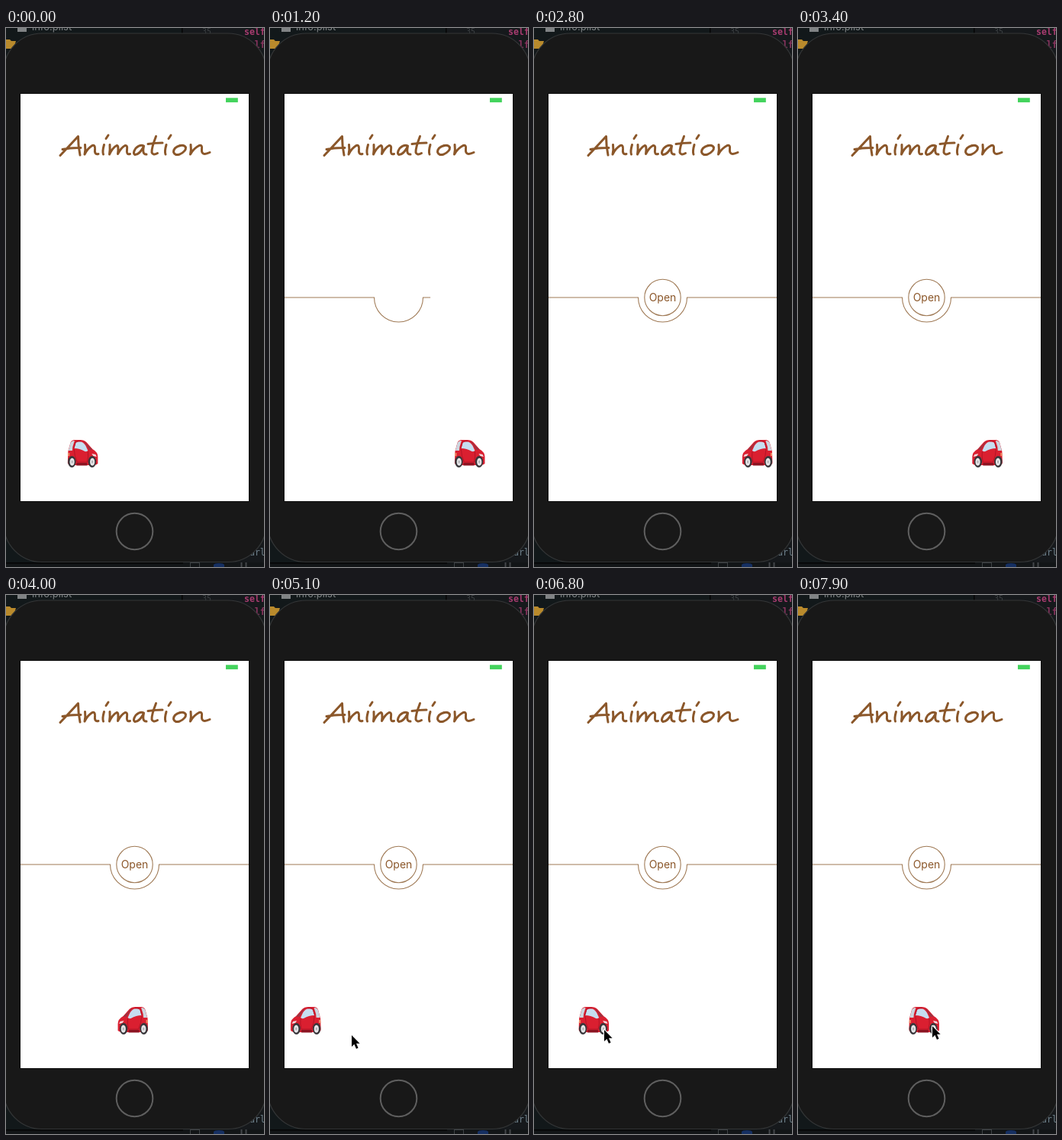
Animation, 338 px wide and 704 px high, one loop 8000 ms. Source, as an HTML page with a canvas:

```html
<!DOCTYPE html>
<html lang="en">
<head>
<meta charset="utf-8">
<title>Animation</title>
<style>
html, body { margin: 0; width: 100%; height: 100%; overflow: hidden; background: #12181a; }
canvas { display: block; width: 338px; height: 704px; }
</style>
</head>
<body>
<canvas id="stage" width="338" height="704" role="img" aria-label="Animation"></canvas>
<script>
const ctx = document.getElementById('stage').getContext('2d');
const LOOP = 8000, STEP = 100;
const BROWN = '#8b572a', THIN = '#a07b57';
const MID = 168.5, LINE_Y = 352, BOWL = 32;
const LEFT = 38.5, RIGHT = 298.5, CAR_Y = 556;
const MOVE = 3000, TURN = 500, HALT = 7463;

const clamp = v => Math.max(0, Math.min(1, v));
const mix = (a, b, p) => a + (b - a) * p;

// cubic-bezier(.42, 0, .58, 1)
function ease(p) {
  p = clamp(p);
  let lo = 0, hi = 1;
  for (let i = 0; i < 24; i++) {
    const s = (lo + hi) / 2, r = 1 - s;
    const x = 1.26 * s * r * r + 1.74 * s * s * r + s * s * s;
    if (x < p) lo = s; else hi = s;
  }
  return lo * lo * (3 - 2 * lo);
}
const phase = (t, start, span) => ease((t - start) / span);

function fill(shape, color) {
  ctx.fillStyle = color;
  ctx.fill(typeof shape === 'string' ? new Path2D(shape) : shape);
}
function stroke(shape, color, width) {
  ctx.strokeStyle = color;
  ctx.lineWidth = width;
  ctx.stroke(typeof shape === 'string' ? new Path2D(shape) : shape);
}
function rect(x, y, w, h, color) {
  ctx.fillStyle = color;
  ctx.fillRect(x, y, w, h);
}
function oval(x, y, rx, ry = rx) {
  const p = new Path2D();
  p.ellipse(x, y, rx, ry, 0, 0, 7);
  return p;
}
function text(str, x, y, font, color, align = 'left') {
  ctx.font = font;
  ctx.fillStyle = color;
  ctx.textAlign = align;
  ctx.fillText(str, x, y);
}

function drawDesk() {
  const mono = '"DejaVu Sans Mono", "Noto Sans Mono", monospace';
  rect(0, 0, 338, 704, '#12181a');
  rect(231, 0, 107, 704, '#16191c');
  rect(230, 0, 1.5, 704, '#050505');
  rect(15, -6, 12, 11, '#808385');
  text('info.plist', 34, 3, '13px Inter, sans-serif', '#7d8284');
  fill('M-2 15H5L7 17H13L10 27H-2Z', '#b98a2c');
  text('35', 257, 8, '10px ' + mono, '#3c4043');
  text('self', 312, 9, 'bold 11.5px ' + mono, '#a83c70');
  text('self', 312, 26, 'bold 11.5px ' + mono, '#8a345f');
  text('url', 319, 689, '11.5px ' + mono, '#71848f');
  rect(0, 698, 338, 6, '#121517');
  rect(0, 698, 232, 1.5, '#050505');
  ctx.strokeStyle = '#3f4346';
  ctx.lineWidth = 1;
  ctx.strokeRect(241.5, 698.5, 12, 9);
  fill('M272 704V701Q273 699 279 699T286 701V704Z', '#152f62');
  rect(307.5, 698, 2, 6, '#43474a');
  rect(313.5, 698, 2, 6, '#43474a');
}

function drawPhone() {
  const body = new Path2D();
  body.roundRect(-3, 7, 344, 690.5, 50);
  fill(body, '#181818');
  stroke(body, '#343637', 1.2);
  rect(18, 85, 301, 534, '#0c0c0c');
  rect(19, 86, 299, 532, '#fff');
  rect(288, 91.3, 15.8, 5.8, '#43d35c');
  stroke(oval(168.5, 657.5, 23.8), '#5f5f5f', 2);
}

const TITLE = [
  'M71 166.5Q82 155 94.5 141.5Q94.5 154 97 166M74 158.5Q86 156 98 156.5',
  'M103.5 152.5Q104.5 159 103 165Q107 157 113 153.5Q117 152.5 116.5 158Q115.5 166 121 164.5',
  'M128.5 152.5Q126 161 127.5 165M134 140L131 144.5',
  'M136 152.5Q136.5 159 135.5 165Q140 156 145 153.5Q148 153 146.5 164.5Q151 156 156 153.5Q159.5 153 158.5 159Q157.5 166 162.5 164.5',
  'M180.5 154Q176 151.5 170 157Q165.5 163.5 169 165.5Q175 165.5 180.5 154.5Q178 165.5 184 165',
  'M196.5 141.5Q190.5 157 191 162.5Q192.5 167 198.5 163.5M186 151.5Q196 150 205 150',
  'M210 152.5Q207.5 161 209 165M216 140L213 144.5',
  'M228 153.5Q219.5 156 219.5 162Q221 167 227.5 165Q236 161 235.5 156Q233.5 152 227 154',
  'M242 152.5Q243 159 241.5 165Q246 157 253 153.5Q257.5 152.5 256.5 158Q255.5 168 267 162.5'
].join('');

function drawTitle() {
  ctx.lineCap = ctx.lineJoin = 'round';
  stroke(TITLE, BROWN, 3);
  ctx.lineCap = 'butt';
  ctx.lineJoin = 'miter';
}

function drawLine(p) {
  if (p < 0.0005) return;
  const flat = MID - BOWL - 19, arc = Math.PI * BOWL;
  const len = p * (2 * flat + arc);
  const path = new Path2D();
  path.moveTo(19, LINE_Y);
  path.lineTo(19 + Math.min(len, flat), LINE_Y);
  if (len > flat) {
    const turn = Math.min(len - flat, arc) / BOWL;
    path.arc(MID, LINE_Y, BOWL, Math.PI, Math.PI - turn, true);
  }
  if (len > flat + arc) path.lineTo(MID + BOWL + len - flat - arc, LINE_Y);
  stroke(path, THIN, 1.1);
}

function drawButton(alpha) {
  ctx.globalAlpha = alpha;
  stroke(oval(MID, LINE_Y, 23.7), THIN, 1.1);
  text('Open', MID, 357, '14px Inter, sans-serif', BROWN, 'center');
  ctx.globalAlpha = 1;
}

function drawCar(x, face) {
  ctx.save();
  ctx.translate(x, CAR_Y);
  ctx.scale(face, 1);
  // body, rear pillar, side glass, windscreen
  fill('M-19.5 12L-19-3L-16-14Q-15-17.5-11-18H-3Q2-18 5-15L13-6Q20-2 20 4V13Q18 15 14 15H-15Q-19 15-19.5 12Z', '#da1f30');
  fill('M-18.5-4L-16-13.5Q-15-17-10.5-17L-13-9L-13.5-4Z', '#cdd6df');
  fill('M-11-7L-9-14Q-8-15.5-5-15.5H-2Q1-15 4-10.5L7-4Q6-2.5 3-3Q-4-7-11-7Z', '#c6def0');
  fill('M1-16.5Q4-15.5 6-12L13-5.5L9-5L5-11Z', '#9c3442');
  stroke('M-11.5-7L-9-15.5Q-7-17-2-16.5M-11-6Q-11 3-7 11H6Q8 4 7-3', '#b31426', 1);
  fill('M-8 12H6V15.5H-8Z', '#8c1422');
  fill('M12 0L17 1L18.5 4L14 3Z', '#f1dadd');
  fill('M-19-1L-17-1L-17 3L-19.3 3Z', '#f08a62');
  for (const wx of [-14, 12.5]) {
    fill(oval(wx, 10.5, 5.2, 7.4), '#38363a');
    fill(oval(wx + 0.3, 10.7, 3.1, 5), '#e6e6e8');
    fill(oval(wx + 0.3, 10.7, 1.1, 1.9), '#b0b0b4');
  }
  ctx.restore();
}

function carPose(t) {
  t = Math.min(t, HALT);
  const end = -1013 + MOVE, back = end + TURN, turn = back + MOVE;
  if (t < end) return [mix(LEFT, RIGHT, phase(t, -1013, MOVE)), 1];
  if (t < back) return [RIGHT, mix(1, -1, phase(t, end, TURN))];
  if (t < turn) return [mix(RIGHT, LEFT, phase(t, back, MOVE)), -1];
  if (t < turn + TURN) return [LEFT, mix(-1, 1, phase(t, turn, TURN))];
  return [mix(LEFT, RIGHT, phase(t, turn + TURN, MOVE)), 1];
}

// time, x, y
const POINTER = [
  [4400, 340, 640], [4800, 107, 575], [5700, 107, 575], [6200, 86, 570],
  [6800, 92, 568], [7500, 173, 568], [7900, 176, 563]
];

function drawPointer(t) {
  if (t <= POINTER[0][0]) return;
  let i = POINTER.findIndex(k => k[0] >= t);
  if (i < 0) i = POINTER.length - 1;
  const [a, b] = [POINTER[i - 1], POINTER[i]];
  const p = clamp((t - a[0]) / (b[0] - a[0]));
  ctx.save();
  ctx.translate(mix(a[1], b[1], p), mix(a[2], b[2], p));
  const arrow = 'M0 0V15L3.4 11.8L6 17.8L8.6 16.6L6 10.8H10.6Z';
  ctx.lineJoin = 'round';
  stroke(arrow, '#fff', 2);
  fill(arrow, '#000');
  ctx.restore();
}

function draw(t) {
  drawDesk();
  drawPhone();
  drawTitle();
  drawLine(phase(t, -13, 2000));
  const shown = phase(t, 1987, TURN);
  if (shown > 0) drawButton(shown);
  ctx.save();
  ctx.beginPath();
  ctx.rect(19, 86, 299, 532);
  ctx.clip();
  drawCar(...carPose(t));
  ctx.restore();
  drawPointer(t);
}

const begin = performance.now();
function tick() {
  let t = Math.floor((performance.now() - begin) % LOOP / STEP) * STEP;
  if (t > 100 && t < 400) t = 100; // short stall
  draw(t);
  requestAnimationFrame(tick);
}
tick();
</script>
</body>
</html>
```
